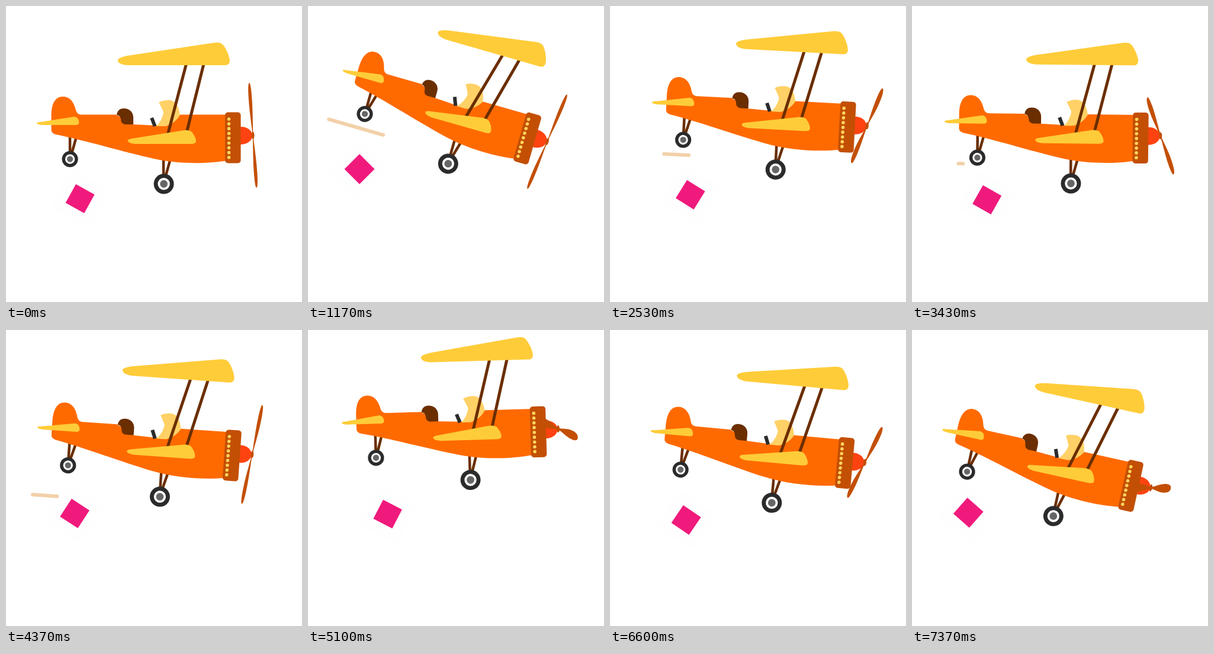
These frames come from a looping animation (500x500 px, 7.41 s). An HTML page:

```html
<!DOCTYPE html>
<html lang="en">
<head>
<meta charset="utf-8">
<title>Biplane</title>
<style>
  html, body { margin: 0; width: 100%; height: 100%; overflow: hidden; background: #fff; }
  svg { display: block; width: 100vw; height: 100vh; }
</style>
</head>
<body>
<svg viewBox="0 0 500 500" xmlns="http://www.w3.org/2000/svg">
  <defs>
    <g id="wheel">
      <circle r="17" fill="#2b2b2d"/>
      <circle r="10.2" fill="#fff"/>
      <circle r="6.4" fill="#666"/>
    </g>
    <path id="blade" d="M-2 -10C-5 -30 -8 -48 -7.500 -66C-7 -84 -4 -90 0 -90C4 -90 7 -84 7.500 -66C8 -48 5 -30 2 -10V0H-2Z"/>
  </defs>
  <g id="plane">
    <g id="cargo">
      <rect x="-37" y="-37" width="74" height="74" rx="6" fill="#fefefe"/>
      <rect x="-18" y="-18" width="36" height="36" fill="#f01a7c"/>
    </g>
    <g id="streaks" stroke="#f2d0a9" stroke-width="6" stroke-linecap="round"></g>

    <path d="M108 218V258M119 220L109 256M266 255V300M278 257L267 297" stroke="#6b2e00" stroke-width="4.500"/>
    <use href="#wheel" transform="translate(108 258.500) scale(.8)"/>
    <use href="#wheel" transform="translate(266.500 300.500)"/>

    <path fill="#ff6a00" d="M76.500 186C76.500 165 83 153 96 153C108 153 115 163 118 176Q120 183.500 127 183.500H186L215 200L256 202H272L294 183.500H374V261C340 267 290 267 250 258C200 247 130 226 84 217Q76.500 215 76.500 209Z"/>
    <path fill="#ffd166" d="M258 163Q266 158.500 276 159C288 160 292 172 294 184Q286 198 270 203H254C262 195 265 186 266 179Q262 170 258 163Z"/>
    <path fill="#6b2e00" d="M187 184C188 176 193 173 199 173C209 173 215 180 215 188V200H201Q194 199 194 191Q193 185 187 184Z"/>
    <path d="M246 189L251.500 203" stroke="#2b2b2d" stroke-width="6"/>
    <path d="M304.500 98L273.500 216M334 98L305 214" stroke="#6b2e00" stroke-width="5"/>
    <g fill="#ffcc39">
      <path d="M189 93C187 89 195 86 205 84L352 62Q363 60.500 367 66C373 74 377 84 378 92Q378 100 370 100H205Q191 99 189 93Z"/>
      <path d="M205.500 228Q205 225 212 224L300 210Q310 209 314 213Q321 222 321 229Q320 233 312 233H218Q207 232 205.500 228Z"/>
      <path d="M52 198Q52 196 58 196L115 187Q121 187 123 194Q125 201 118 201H60Q52 200 52 198Z"/>
    </g>

    <ellipse cx="397" cy="219" rx="19" ry="15" fill="#ff4310"/>
    <g transform="translate(417 218.500)" fill="#c34f05">
      <ellipse rx="2.500" ry="6"/>
      <g id="prop">
        <use href="#blade"/>
        <use href="#blade" transform="rotate(180)"/>
      </g>
    </g>
    <rect x="370" y="179.500" width="26.500" height="86" rx="5" fill="#c34f05"/>
    <path d="M376.500 191V257" stroke="#ffd45c" stroke-width="5.600" stroke-linecap="round" stroke-dasharray="0 8.100"/>
  </g>
</svg>
<script>
  const LOOP = 7410;
  const STREAK_LIFE = 640;

  // Key poses of the drifting flight: time, centre x, centre y, tilt.
  const poses = [
    [0, 240, 200, 0], [420, 262, 200, -8], [1170, 239, 162.5, 16],
    [1950, 245, 171, -8], [2530, 258.5, 174.5, 3], [3430, 243, 199, .6],
    [4370, 240.5, 179.5, 4], [5250, 246, 152, -3], [5830, 247, 162.5, -7.6],
    [6500, 256, 187, 6], [6920, 252, 195, 0], [7370, 234.5, 210.5, 12.4]
  ];

  // Wind streaks: start time, height, left end.
  const gusts = [[728, 284, 52], [1989, 284, 77], [2809, 269, 76], [3816, 312, 52], [5702, 292, 52]];

  const $ = id => document.getElementById(id);
  const clamp = v => Math.max(0, Math.min(1, v));
  const lerp = (a, b, u) => a + (b - a) * u;
  const cycle = (t, turns) => Math.cos(2 * Math.PI * turns * t / LOOP);

  // Slope through a pose; turning points are flat.
  function slope(i, col) {
    const k = poses[i], a = poses[i - 1] || k, b = poses[i + 1] || k;
    const turning = (k[col] - a[col]) * (b[col] - k[col]) < 0;
    return turning ? 0 : (b[col] - a[col]) / (b[0] - a[0]);
  }

  function poseAt(t) {
    const i = Math.max(0, poses.findLastIndex((p, n) => t >= p[0] && n < poses.length - 1));
    const a = poses[i], b = poses[i + 1], span = b[0] - a[0];
    const u = clamp((t - a[0]) / span), v = 1 - u, ease = u * u * (3 - 2 * u);
    return [1, 2, 3].map(col => lerp(a[col], b[col], ease)
      + span * u * v * (v * slope(i, col) - u * slope(i + 1, col)));
  }

  const streaks = gusts.map(() =>
    $('streaks').appendChild(document.createElementNS('http://www.w3.org/2000/svg', 'path')));

  function drawStreak(path, [start, y, left], t) {
    const p = (t - start) / STREAK_LIFE;
    const head = lerp(254, left, clamp(p / .6));
    const tail = lerp(254, left, clamp((p - .35) / .65));
    path.setAttribute('d', p > 0 && p < 1 ? `M${head} ${y}H${tail}` : '');
  }

  function draw(t) {
    const [x, y, tilt] = poseAt(t);
    $('plane').setAttribute('transform',
      `translate(${x} ${y}) rotate(${tilt}) translate(-240 -200)`);

    const drop = 32 * Math.pow((1 - cycle(t, 2)) / 2, .7);
    $('cargo').setAttribute('transform', `translate(125 ${325.5 + drop}) rotate(29)`);

    // Steady spin with a slight surge, seen almost edge-on.
    const spin = -30 - .8905 * t + 20 * cycle(t, 1);
    $('prop').setAttribute('transform', `scale(.37 1) rotate(${spin})`);

    streaks.forEach((path, n) => drawStreak(path, gusts[n], t));
  }

  const begin = performance.now();
  function tick() {
    draw((performance.now() - begin) % LOOP);
    requestAnimationFrame(tick);
  }
  tick();
</script>
</body>
</html>
```
